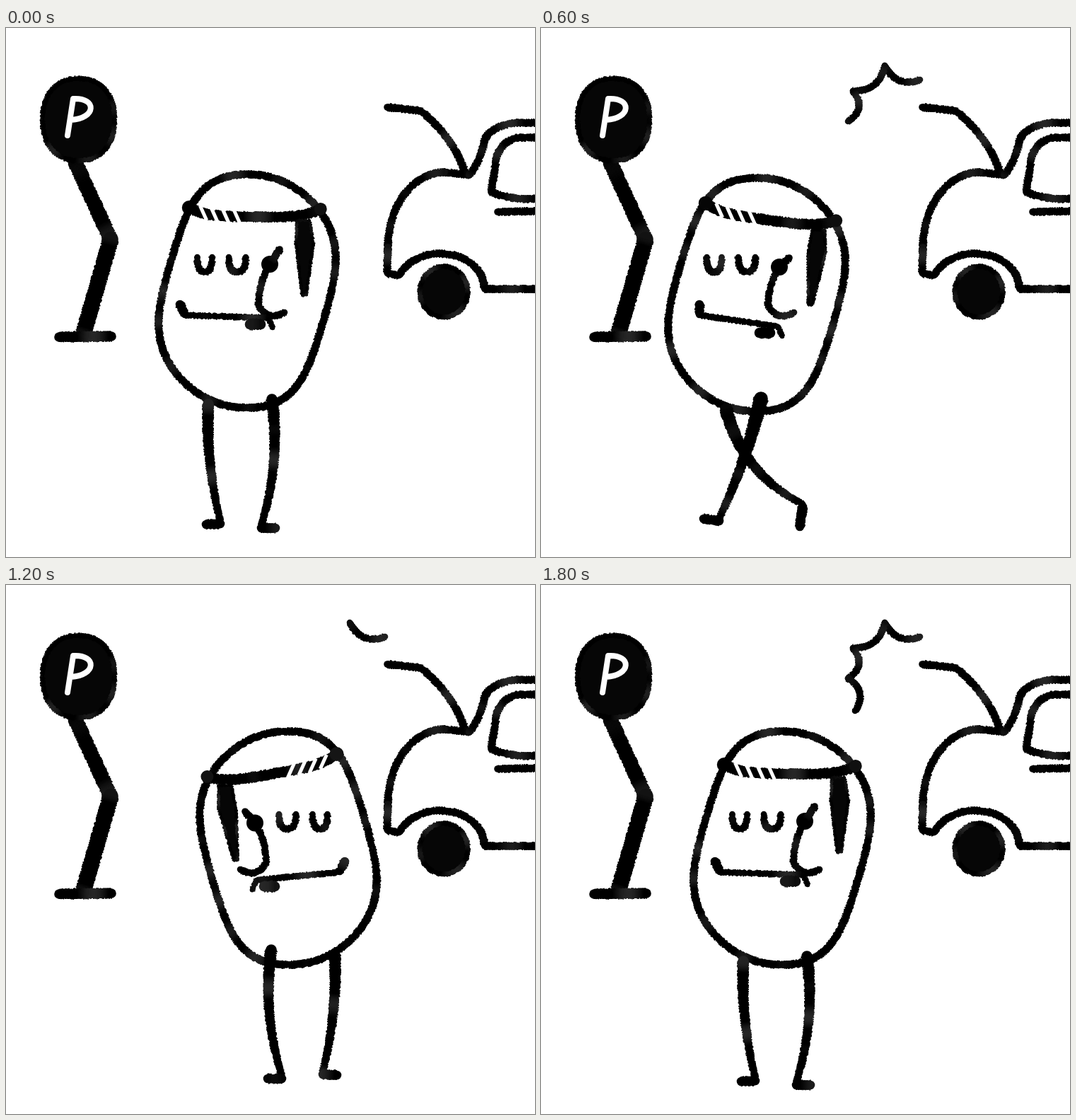
Recreate the animation shown at these times as an HTML page with a canvas. Size 748 px wide and 748 px high, loop 2000 ms.

```html
<!DOCTYPE html>
<html lang="en">
<head>
<meta charset="utf-8">
<title>Waiting by the car</title>
<style>
  html, body { margin: 0; width: 100%; height: 100%; overflow: hidden; background: #fff; }
  canvas { display: block; width: 100vw; height: 100vh; }
</style>
</head>
<body>
<canvas id="stage" width="748" height="748"></canvas>
<script>
const ctx = document.getElementById('stage').getContext('2d');
const STEP_MS = 200;
const { PI, sin, cos, abs, sign, max, min, ceil, floor, hypot } = Math;

const hash = n => {
  const s = sin(n * 127.1) * 43758.5453;
  return s - floor(s);
};

function ink(x, y) {
  const v = max(0, 22 * sin(x * .09 + y * .05) + 18 * sin(y * .13 - x * .04)) | 0;
  return `rgb(${v},${v},${v})`;
}

// ---------- crayon ----------
function dot(x, y, r) {
  ctx.fillStyle = ink(x, y);
  ctx.beginPath();
  ctx.arc(x, y, r, 0, 2 * PI);
  ctx.fill();
}

// Points of the curve at(t), t in 0..1, about half a pixel apart.
function sample(at) {
  let length = 0;
  for (let i = 0; i < 24; i++) {
    const [a, b] = [at(i / 24), at((i + 1) / 24)];
    length += hypot(b[0] - a[0], b[1] - a[1]);
  }
  const n = max(4, ceil(length * 2));
  return Array.from({ length: n + 1 }, (_, i) => at(i / n));
}

// Hairlines across the curve give the toothed edge.
function trace(at, w0 = 10, w1 = w0) {
  const pts = sample(at), last = pts.length - 1;
  const seed = pts[0][0] + pts[0][1];
  dot(...pts[0], w0 / 2 - .2);
  dot(...pts[last], w1 / 2 - .2);
  ctx.lineWidth = 1.5;
  ctx.lineCap = 'butt';
  pts.forEach(([x, y], i) => {
    const p = pts[max(0, i - 1)], q = pts[min(last, i + 1)];
    const len = hypot(q[0] - p[0], q[1] - p[1]) || 1;
    const nx = (p[1] - q[1]) / len, ny = (q[0] - p[0]) / len;
    const half = (w0 + (w1 - w0) * i / last) / 2 - .9;
    const tooth = floor(i / 2) + seed;
    const l = half + 2 * hash(tooth), r = half + 2 * hash(tooth + 500);
    ctx.strokeStyle = ink(x, y);
    ctx.beginPath();
    ctx.moveTo(x + nx * l, y + ny * l);
    ctx.lineTo(x - nx * r, y - ny * r);
    ctx.stroke();
  });
}

// Line that bulges by bend; power flattens the middle.
const bowed = (x0, y0, x1, y1, bend, power = 2) => {
  const dx = x1 - x0, dy = y1 - y0, len = hypot(dx, dy);
  return t => {
    const b = bend * (1 - abs(2 * t - 1) ** power) / len;
    return [x0 + dx * t - dy * b, y0 + dy * t + dx * b];
  };
};
const bow = (x0, y0, x1, y1, bend, w0, w1) => trace(bowed(x0, y0, x1, y1, bend), w0, w1);
const seg = (x0, y0, x1, y1, w) => bow(x0, y0, x1, y1, 0, w);

const round = (v, n) => sign(v) * abs(v) ** (2 / n);
const curve = (x, y, rx, ry, from, to, n = 2) => t => {
  const a = from + (to - from) * t;
  return [x + rx * round(cos(a), n), y + ry * round(sin(a), n)];
};
const arc = (...shape) => trace(curve(...shape));

function fill(points) {
  ctx.fillStyle = '#060606';
  ctx.beginPath();
  points.forEach(p => ctx.lineTo(...p));
  ctx.fill();
}

function disc(x, y, rx, ry, n) {
  const edge = curve(x, y, rx - 3, ry - 3, 0, 2 * PI, n);
  fill(sample(edge));
  trace(edge, 6);
}

function mirrored(axis, draw) {
  ctx.save();
  ctx.translate(axis, 0);
  ctx.scale(-1, 1);
  draw();
  ctx.restore();
}

// ---------- scenery ----------
function parkingSign() {
  seg(97, 188, 148, 299, 20);
  seg(148, 299, 110, 430, 22);
  seg(75, 437, 149, 436, 14);
  disc(102.5, 129.5, 54, 61, 2.25);
  ctx.strokeStyle = '#fff';
  ctx.lineWidth = 8;
  ctx.lineCap = ctx.lineJoin = 'round';
  ctx.beginPath();
  ctx.moveTo(87, 152);
  ctx.lineTo(95, 100);
  ctx.bezierCurveTo(129, 98, 128, 128, 92, 130);
  ctx.stroke();
}

function car() {
  seg(539, 112, 586, 117);
  bow(586, 117, 650, 206, -8);
  seg(655, 208, 620, 204);
  arc(620, 310, 80, 106, PI, 1.5 * PI);
  seg(540, 310, 539, 346);
  seg(540, 347, 554, 350);
  arc(614, 367, 62, 48, 1.12 * PI, 2 * PI);
  seg(677, 369, 752, 369);
  bow(655, 208, 676, 162, 3);
  arc(728, 164, 52, 30, PI, 1.5 * PI);
  seg(728, 134, 752, 134);
  arc(728, 195, 36, 40, PI, 1.5 * PI);
  seg(728, 155, 752, 155);
  seg(692, 195, 686, 230);
  bow(686, 232, 752, 241, 4);
  seg(695, 260, 752, 259);
  disc(619, 373, 37, 39);
}

function spark(count) {
  const tips = [[536, 73], [486, 53], [441, 89], [434, 132], [444, 178]];
  for (let i = 0; i < count; i++) bow(...tips[i], ...tips[i + 1], -12, 9);
}

// ---------- head ----------
function egg(x, y) {
  trace(t => {
    const a = 2 * PI * t, v = round(sin(a), 2.25);
    return [x + 119 * round(cos(a), 2.25) - 12 * sin(PI * v), y + 165 * v];
  });
}

function headband(x, y, tilt) {
  const dx = 93 * cos(tilt), dy = 93 * sin(tilt);
  const band = bowed(x - dx, y - dy, x + dx, y + dy, 12, 4);
  trace(band, 14);
  dot(...band(0), 10);
  dot(...band(1), 9);

  ctx.strokeStyle = '#fff';
  ctx.lineWidth = 5;
  for (let i = 0; i < 4; i++) {
    const [sx, sy] = band(.11 + .085 * i);
    ctx.beginPath();
    ctx.moveTo(sx - 4.5, sy - 10);
    ctx.lineTo(sx + 4.5, sy + 10);
    ctx.stroke();
  }

  const [hx, hy] = band(.87), lean = 2 - 100 * tilt;
  const hair = [[-9, 0], [9, 0], [14, .3], [3, 1], [-3, 1], [-11, .3]]
    .map(([px, v]) => [hx + px + lean * v, hy + 8 + 106 * v]);
  fill(hair);
  hair.forEach((p, i) => seg(...p, ...hair[(i + 1) % hair.length], 3));
}

function face(x, y, droop, tuck) {
  const eye = (ex, rx) => trace(curve(ex, y - 10, rx, 21, PI, 0, 2.6), 9);
  eye(x, 10.5);
  eye(x + 46, 12);

  const noseX = x + 92, noseY = y + 4 * droop;
  dot(noseX, noseY, 12);
  seg(noseX, noseY, noseX + 14, noseY - 21 + 8 * droop, 10);
  bow(noseX, noseY, x + 76, y + 58, 4, 9);
  bow(x + 76, y + 58, x + 113, y + 68, 10, 9);

  const left = x - 28 + tuck, low = y + 76 + 12 * droop;
  bow(left + tuck - 7, y + 57, left, y + 71, 0, 13, 11);
  bow(left, y + 72, x + 89, low, 0, 8);
  seg(x + 90, low, x + 96, low + 14, 7);
  seg(x + 64, low + 9, x + 79, low + 9, 15);
}

function head(x, y, tilt, droop, tuck = 0, turn = 0) {
  egg(x, y);
  headband(x + 10 + 75 * tilt, y - 117, tilt);
  face(x - 60 + turn, 334, droop, tuck);
}

// ---------- legs ----------
function leg(hipX, hipY, x, y, bend, toeX, toeY, width = 16) {
  bow(hipX, hipY, x, y, bend, width, 9);
  seg(x, y + 4, x + toeX, y + 4 + toeY, 13);
}

function standLegs(x, y) {
  leg(x - 55, y + 160, x - 38, y + 325, 6, -20, 1);
  leg(x + 35, y + 153, x + 20, y + 331, -10, 20, 0);
}

function passLegs() {
  leg(295, 541, 328, 697, 4, -22, 0);
  leg(346, 527, 387, 680, 37, -7, 21, 18);
}

function strideLegs() {
  leg(262, 539, 370, 673, 20, -4, 28, 18);
  leg(311, 524, 252, 693, -5, -22, -3, 20);
}

function kickLegs() {
  leg(399, 519, 350, 683, -20, 11, 12);
  leg(454, 529, 460, 688, 0, 25, -1);
}

// ---------- poses ----------
const walkHead = (x, tilt) => head(x, 377, tilt, 1, 7);

const stand = () => { head(341, 372, .01, 0); standLegs(341, 372); };
const lift = () => { walkHead(333, .07); mirrored(735, kickLegs); };
const pass = () => { walkHead(333, .07); passLegs(); };
const stride = () => { walkHead(305, .133); strideLegs(); };
const strideBack = () => {
  mirrored(664, () => walkHead(333, .33));
  mirrored(648, strideLegs);
};
const kickBack = () => {
  mirrored(763, () => head(374, 372, .33, .6));
  kickLegs();
};
const proud = () => { head(374, 372, .173, .6, 0, 15); standLegs(363, 363); };
const proudBack = () => mirrored(773, proud);

const poses = [stand, lift, pass, stride, strideBack, kickBack, proudBack, proud, pass, stand];

function paint(step) {
  ctx.fillStyle = '#fff';
  ctx.fillRect(0, 0, 748, 748);
  parkingSign();
  car();
  spark(step % 5);
  poses[step]();
}

const start = performance.now();
let shown = -1;

function tick() {
  const step = floor((performance.now() - start) / STEP_MS) % poses.length;
  if (step !== shown) paint(shown = step);
  requestAnimationFrame(tick);
}
tick();
</script>
</body>
</html>
```
